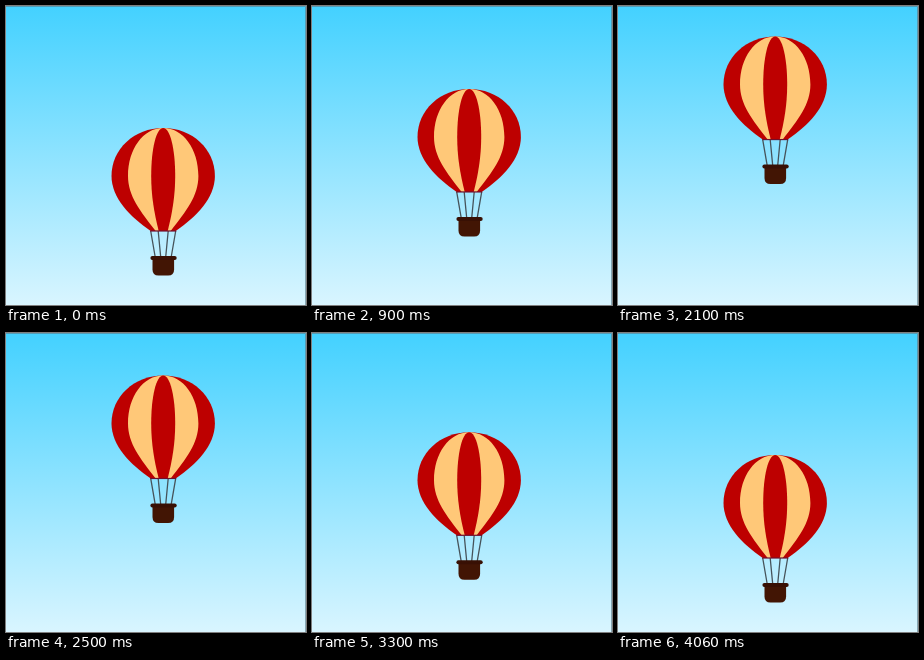
Animation of 300x299 px, one loop 4.22 s. Source, as an HTML page:

```html
<!DOCTYPE html>
<html lang="en">
<head>
<meta charset="utf-8">
<title>Hot air balloon</title>
<style>
  html, body { margin: 0; width: 100%; height: 100%; overflow: hidden; }
  svg { display: block; width: 100%; height: 100%; }
</style>
</head>
<body>
<svg viewBox="0 0 300 299">
  <defs>
    <linearGradient id="sky" x2="0" y2="1">
      <stop stop-color="#43d1ff"/>
      <stop offset="1" stop-color="#d9f5ff"/>
    </linearGradient>
  </defs>
  <rect width="300" height="299" fill="url(#sky)"/>
  <path d="M0 .5H299.5V299" fill="none" stroke="#5f7f8c" stroke-opacity=".65"/>

  <!-- Drawn at its lowest position, centred on x = 0 -->
  <g id="balloon">
    <path d="M-12.5 225L-8 251M-5 225L-2.5 251M5 225L2.5 251M12.5 225L8 251"
          stroke="#46535a" stroke-width="1.3"/>
    <path fill="#bd0000" d="M-12.5 225C-33 211-51.7 192-51.7 170C-51.7 143-29 122 0 122S51.7 143 51.7 170C51.7 192 33 211 12.5 225Z"/>
    <path fill="#ffc878" d="M-7.5 225C-23 205-35.2 190-35.2 170C-35.2 143-20 122 0 122S35.2 143 35.2 170C35.2 190 23 205 7.5 225Z"/>
    <path fill="#bd0000" d="M-4.5 225C-9 207-12 190-12 170C-12 143-7 122 0 122S12 143 12 170C12 190 9 207 4.5 225Z"/>
    <path d="M-13 225H13" stroke="#70102c" stroke-width="1.2"/>
    <path fill="#421504" d="M-10.7 252H10.9V263.5Q10.9 269.5 4.9 269.5H-4.7Q-10.7 269.5-10.7 263.5Z"/>
    <rect x="-12.8" y="250" width="26.3" height="4" rx="2" fill="#381004"/>
  </g>
</svg>
<script>
  const LOOP = 4220, HALF = 2000, STEP = 100, RISE = 92, LEAD = 12;
  const balloon = document.getElementById('balloon');

  // Cubic Bézier ease-in-out (.42, 0, .58, 1), solved by bisection.
  function easeInOut(x) {
    let low = 0, high = 1;
    for (let i = 0; i < 24; i++) {
      const s = (low + high) / 2;
      const bx = 1.26 * (1 - s) ** 2 * s + 1.74 * (1 - s) * s * s + s ** 3;
      if (bx < x) low = s; else high = s;
    }
    return low * low * (3 - 2 * low);
  }

  // The picture moves in steps; the last pose and the one before it hold longer.
  function steppedTime(t) {
    if (t >= 4060) return 2 * HALF;
    return Math.min(Math.floor(t / STEP) * STEP, 3900) + LEAD;
  }

  function draw(now) {
    const t = steppedTime(now % LOOP);
    const height = RISE * easeInOut(1 - Math.abs(t - HALF) / HALF);
    balloon.setAttribute('transform', `translate(157.2 ${-height})`);
  }

  const start = performance.now();
  function tick() {
    draw(performance.now() - start);
    requestAnimationFrame(tick);
  }
  tick();
</script>
</body>
</html>
```
